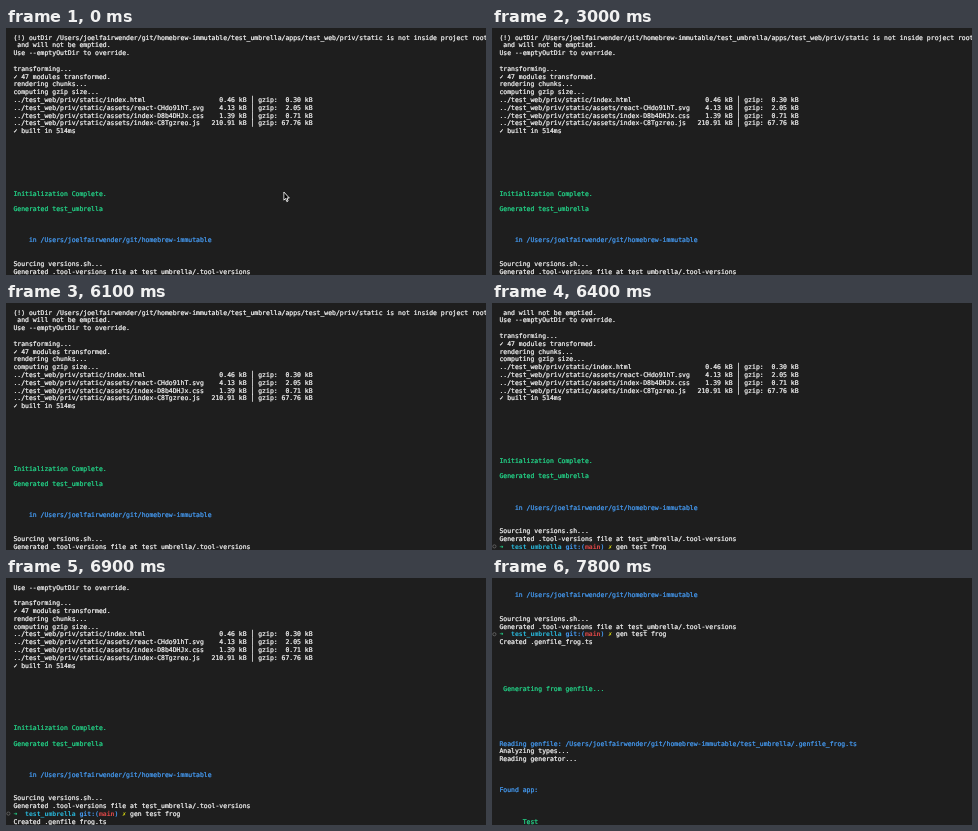
An HTML page that plays this animation: 480x247 px, repeating every 8000 ms.

```html
<!DOCTYPE html>
<html lang="en">
<head>
<meta charset="utf-8">
<title>Terminal session</title>
<style>
  html, body {
    margin: 0;
    width: 100%;
    height: 100%;
    overflow: hidden;
    background: #1e1e1e;
  }
  /* Laid out at ten times the size so that small type keeps exact advances. */
  .stage {
    position: absolute;
    left: 0;
    top: 0;
    width: 4800px;
    height: 2470px;
    overflow: hidden;
    transform: scale(.1);
    transform-origin: 0 0;
  }
  .screen {
    position: absolute;
    left: 0;
    top: 55px;
    width: 4800px;
    height: 2415px;
    overflow: hidden;
  }
  pre {
    --row: 78px;
    position: absolute;
    left: 0;
    top: 0;
    margin: 0;
    padding-left: 74px;
    color: #f4f4f4;
    font: 64.55px/78px "DejaVu Sans Mono", monospace;
    font-variant-ligatures: none;
    text-rendering: geometricPrecision;
    -webkit-text-stroke: 2.5px currentColor;
    animation: scroll 8s step-end infinite;
  }
  b {
    font-weight: 700;
    -webkit-text-stroke-width: 0;
  }
  .green { color: #23d98b; }
  .blue { color: #459cf5; }
  .cyan { color: #29b8db; }
  .red { color: #e04848; }
  .yellow { color: #e5e510; }
  .mark {
    position: absolute;
    left: 5px;
    top: calc(31 * var(--row) + 20px);
    width: 26px;
    height: 26px;
    border: 6px solid #808080;
    border-radius: 50%;
  }
  .pointer {
    position: absolute;
    left: 2772px;
    top: 1634px;
    width: 72px;
    height: 120px;
    animation: leave 8s step-end infinite;
  }
  @keyframes scroll {
    0% { top: 0; }
    80% { top: calc(-1 * var(--row)); }
    83.75% { top: calc(-2 * var(--row)); }
    87.5%, 100% { top: calc(-25 * var(--row)); }
  }
  @keyframes leave {
    0% { visibility: visible; }
    1.25%, 100% { visibility: hidden; }
  }
</style>
</head>
<body>
<div class="stage">
<div class="screen"><pre>(!) outDir /Users/joelfairwender/git/homebrew-immutable/test_umbrella/apps/test_web/priv/static is not inside project root
 and will not be emptied.
Use --emptyOutDir to override.

transforming...
✓ 47 modules transformed.
rendering chunks...
computing gzip size...
../test_web/priv/static/index.html                   0.46 kB │ gzip:  0.30 kB
../test_web/priv/static/assets/react-CHdo91hT.svg    4.13 kB │ gzip:  2.05 kB
../test_web/priv/static/assets/index-D8b4DHJx.css    1.39 kB │ gzip:  0.71 kB
../test_web/priv/static/assets/index-C8Tgzreo.js   210.91 kB │ gzip: 67.76 kB
✓ built in 514ms







<span class="green">Initialization Complete.

Generated test_umbrella</span>



<span class="blue">    in /Users/joelfairwender/git/homebrew-immutable</span>


Sourcing versions.sh...
Generated .tool-versions file at test_umbrella/.tool-versions
<i class="mark"></i><b class="green">➜</b>  <b class="cyan">test_umbrella</b> <b class="blue">git:(<span class="red">main</span>)</b> <b class="yellow">✗</b> gen test frog
Created .genfile_frog.ts





<span class="green"> Generating from genfile...</span>






<span class="blue">Reading genfile: /Users/joelfairwender/git/homebrew-immutable/test_umbrella/.genfile_frog.ts</span>
Analyzing types...
Reading generator...



<span class="blue">Found app:</span>



<span class="green">      Test</span>
</pre></div>
<svg class="pointer" viewBox="0 0 6 10">
  <path d="M.5.5V7.3L2 5.9 3 8.5 4.1 8 3.1 5.5H5.1Z" fill="#000" stroke="#fff" stroke-width=".75"/>
</svg>
</div>
</body>
</html>
```
